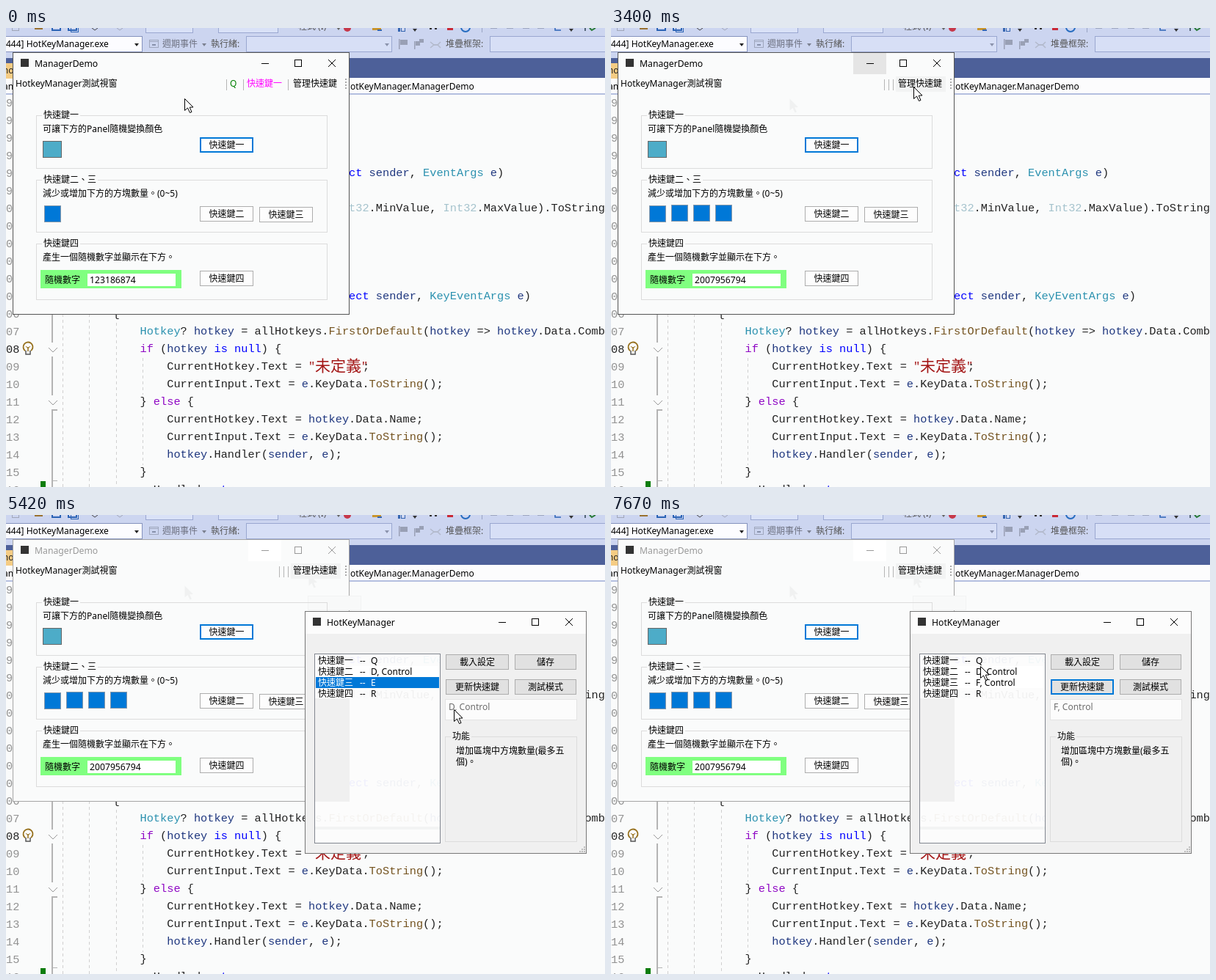
Write an HTML page with a canvas that moves like this. It is 816 px wide and 626 px high and loops after 8 s.

```html
<!DOCTYPE html>
<html lang="zh-Hant">
<head>
<meta charset="utf-8">
<title>Hotkey manager demo</title>
<style>
html, body { margin: 0; width: 100%; height: 100%; overflow: hidden; background: #fafbfb; }
canvas { display: block; }
</style>
</head>
<body>
<canvas id="stage" width="816" height="626"></canvas>
<script>
const LOOP = 8000, TICK = 69;
const UI = '"Noto Sans", "Noto Sans CJK TC", "Noto Sans CJK", sans-serif';
const MONO = '"Liberation Mono", "Noto Sans CJK TC", monospace';
const BLUE = '#0078d7', PAPER = '#fafbfb', GHOST = '#f0f1f1';
const COL = 9.18, CODE_X = 182.5;

const stage = document.getElementById('stage').getContext('2d');
const deskCanvas = document.createElement('canvas');
deskCanvas.width = 816;
deskCanvas.height = 626;
let g = deskCanvas.getContext('2d');

// Drawing helpers
function fill(x, y, w, h, color) {
  g.fillStyle = color;
  g.fillRect(x, y, w, h);
}
function frame(x, y, w, h, color, line = 1) {
  g.strokeStyle = color;
  g.lineWidth = line;
  g.strokeRect(x + line / 2, y + line / 2, w - line, h - line);
}
function box(x, y, w, h, back, edge, line = 1) {
  fill(x, y, w, h, back);
  frame(x, y, w, h, edge, line);
}
function path(points, color, width = 1, close = false) {
  g.beginPath();
  points.forEach(([x, y]) => g.lineTo(x, y));
  if (close) g.closePath();
  g.strokeStyle = color;
  g.lineWidth = width;
  g.stroke();
}
function label(text, x, y, color = '#000', size = 12, family = UI) {
  g.font = `${size}px ${family}`;
  g.fillStyle = color;
  g.fillText(text, x, y);
}
function disc(x, y, r, color) {
  g.beginPath();
  g.arc(x, y, r, 0, 7);
  g.fillStyle = color;
  g.fill();
}
function caret(x, y, color) {
  g.beginPath();
  g.moveTo(x - 3, y - 2);
  g.lineTo(x + 3, y - 2);
  g.lineTo(x, y + 2);
  g.fillStyle = color;
  g.fill();
}
function button(text, x, y, w, look = 'plain', back = '#fdfdfd') {
  const fills = { hover: '#e5f1fb', pressed: '#cce4f7' };
  const h = 21;
  box(x, y, w, h, fills[look] || back, look === 'plain' ? '#adadad' : BLUE, look === 'focus' ? 2 : 1);
  g.textAlign = 'center';
  label(text, x + w / 2, y + 15);
  g.textAlign = 'left';
}
function group(title, x, y, w, h, back) {
  frame(x, y, w, h, '#dcdcdc');
  fill(x + 8, y, title.length * 12 + 4, 1, back);
  label(title, x + 10, y + 4);
}
function windowBar(x, y, w, title, color) {
  fill(x + 11, y + 9, 11, 11, '#333');
  label(title, x + 30, y + 20, color, 12.2);
  const r = x + w;
  fill(r - 119, y + 15, 10, 1, color);
  frame(r - 74, y + 10, 10, 10, color);
  path([[r - 28, y + 10], [r - 18, y + 20]], color);
  path([[r - 18, y + 10], [r - 28, y + 20]], color);
}
function pointerShape(x, y) {
  const tip = [[0, 0], [0, 16], [4, 12.5], [7, 19], [9.5, 18], [6.7, 11.7], [11.5, 11.5]];
  g.beginPath();
  tip.forEach(([dx, dy]) => g.lineTo(x + .5 + dx, y + .5 + dy));
  g.closePath();
}
function pointer(x, y) {
  pointerShape(x, y);
  g.fillStyle = '#fff';
  g.fill();
  g.strokeStyle = '#000';
  g.lineWidth = 1;
  g.stroke();
}
function trace(x, y) {
  pointerShape(x, y);
  g.fillStyle = GHOST;
  g.fill();
}

// Editor behind the windows
const INK = { k: '#0000ff', t: '#2b91af', f: '#a5c3cd', m: '#74531f', v: '#1f377f', p: '#8f08c4', s: '#a31515', x: '#222' };
const CODE = [
  [98, 31, 'k:ct|v: sender|x:, |t:EventArgs|v: e|x:)'],
  [100, 31, 'f:t32|x:.MinValue, |f:Int32|x:.MaxValue).|x:ToString'],
  [105, 31, 'k:ect|v: sender|x:, |t:KeyEventArgs|v: e|x:)'],
  [106, -4, 'x:{'],
  [107, 0, 't:Hotkey|x:? |v:hotkey|x: = allHotkeys.|m:FirstOrDefault|x:(|v:hotkey|x: => |v:hotkey|x:.Data.Comb'],
  [108, 0, 'p:if|x: (|v:hotkey|k: is null|x:) {'],
  [109, 4, 'x:CurrentHotkey.Text = |s:"'],
  [110, 4, 'x:CurrentInput.Text = |v:e|x:.KeyData.|m:ToString|x:();'],
  [111, 0, 'x:} |p:else|x: {'],
  [112, 4, 'x:CurrentHotkey.Text = |v:hotkey|x:.Data.Name;'],
  [113, 4, 'x:CurrentInput.Text = |v:e|x:.KeyData.|m:ToString|x:();'],
  [114, 4, 'v:hotkey|x:.Handler(|v:sender|x:, |v:e|x:);'],
  [115, 0, 'x:}'],
  [116, 0, 'v:e|x:.Handled = |k:true|x:;']
];
const lineY = n => 101 + 24 * (n - 94);

function drawCode() {
  for (let n = 94; n <= 116; n++) {
    label(String(n % 100).padStart(2, '0'), 0, lineY(n) + 6, n === 108 ? '#222' : '#929292', 15.3, MONO);
  }
  for (const [n, col, source] of CODE) {
    let x = CODE_X + col * COL;
    for (const part of source.split('|')) {
      const text = part.slice(2);
      label(text, x, lineY(n) + 5, INK[part[0]], 15.3, MONO);
      x += text.length * COL;
    }
  }
  label('未定義', 421, 468, INK.s, 21, UI);
  label('"', 484, 466, INK.s, 15.3, MONO);
  label(';', 486, 466, INK.x, 15.3, MONO);
}

function drawGutter() {
  g.setLineDash([4, 4]);
  for (const x of [77.5, 113.5, 150.5]) path([[x, x > 150 ? 402 : 390], [x, 626]], '#d0d0d0');
  path([[186.5, 450], [186.5, 500]], '#d0d0d0');
  path([[186.5, 522], [186.5, 596]], '#d0d0d0');
  g.setLineDash([]);
  path([[63, 391], [63, 429]], '#b4b4b4', 2);
  path([[63, 448], [63, 501]], '#b4b4b4', 2);
  path([[70, 521], [63, 521], [63, 626]], '#b4b4b4', 2);
  path([[63, 617.5], [70, 617.5]], '#b4b4b4');
  for (const y of [436, 508]) path([[58, y], [64, y + 6], [70, y]], '#999');
  fill(47, 618, 7, 8, '#0b7d0b');
  g.beginPath();
  g.arc(30, 435, 6.5, 2.2, 7.2);
  g.strokeStyle = '#96701c';
  g.lineWidth = 1.8;
  g.stroke();
  path([[27, 440], [27, 445], [33, 445], [33, 440]], '#555', 1.5);
  path([[30, 441], [30, 435]], '#96701c', 1.5);
  path([[27, 434], [30, 437], [33, 434]], '#96701c');
}

function drawToolbars() {
  const edge = '#9aa7d0';
  fill(0, 0, 816, 41, '#ccd5f0');
  box(190, -10, 65, 17, '#d9e1f7', edge);
  box(289, -10, 82, 17, '#d9e1f7', edge);
  frame(8, -6, 10, 10, '#a0a6b8');
  fill(39, 0, 11, 2, '#9b7434');
  for (const x of [62, 84]) frame(x, -8, 13, 12, '#2b63b5', 2);
  frame(88, -4, 11, 10, '#2b63b5');
  path([[117, 0], [121, 3], [125, 0]], '#444');
  path([[151, 0], [155, 3], [159, 0]], '#a0a6b8');
  label('程式 (I)', 398, 2, '#555');
  caret(453, 1, '#666');
  disc(465, 0, 5, '#c6384a');
  fill(499, 0, 12, 3, '#c9962f');
  fill(506, 2, 6, 2, '#3465b0');
  fill(534, 0, 3, 5, '#3465b0');
  frame(538, -4, 6, 9, '#3465b0');
  caret(557, 3, '#333');
  fill(577, 0, 3, 2, '#333');
  fill(584, 0, 3, 2, '#333');
  fill(601, 0, 8, 3, '#c92b38');
  g.beginPath();
  g.arc(626, -1, 6, 0, 3.14);
  g.strokeStyle = '#276dc0';
  g.lineWidth = 2;
  g.stroke();
  fill(648, 0, 1, 6, '#99a4c4');
  for (const x of [660, 682, 704, 724]) fill(x, 0, 9, 1, '#9da6bf');
  path([[748, 0], [748, 3], [756, 3]], '#2b63b5', 1.5);
  caret(770, 3, '#333');
  fill(788, 0, 2, 4, '#567');
  path([[795, 0], [798, 3], [803, 0]], '#287a36', 2);

  box(-4, 11, 190, 22, '#fcfcff', '#8593bd');
  label('444] HotKeyManager.exe', 0, 26);
  caret(178, 23, '#222');
  frame(195, 16, 13, 11, '#9fa7bd');
  fill(195, 18, 13, 1, '#9fa7bd');
  path([[199, 23], [204, 23]], '#8791ab', 2);
  label('週期事件', 213, 26, '#6d7180');
  caret(270, 23, '#7b8090');
  label('執行緒:', 279, 26, '#555');
  box(327, 11, 199, 22, '#d7dff6', edge);
  caret(519, 23, '#8b93ac');
  fill(535, 15, 1.5, 14, '#99a0b5');
  fill(537, 16, 10, 7, '#99a0b5');
  fill(556, 18, 1.5, 11, '#99a0b5');
  fill(558, 18, 6, 6, '#99a0b5');
  fill(563, 15, 6, 5, '#99a0b5');
  path([[578, 19], [583, 23], [588, 23], [592, 19]], '#b2b9cb', 1.5);
  path([[578, 27], [583, 23], [588, 23], [592, 27]], '#b2b9cb', 1.5);
  label('堆疊框架:', 599, 26, '#555');
  box(659, 11, 170, 22, '#d7dff6', edge);

  fill(0, 41, 816, 27, '#4d6099');
  fill(0, 48, 10, 21, '#f5cc84');
  label('mo', -8, 62, '#222');
  fill(0, 69, 816, 20, '#fcfcfd');
  fill(0, 89, 816, 2, '#b4bfe0');
  label('an', -4, 84);
  label('otKeyManager.ManagerDemo', 469, 84);
}

fill(0, 0, 816, 626, PAPER);
drawCode();
drawGutter();
drawToolbars();

// Timeline: hard state changes
const STEPS = [
  [0, { key: 'Q', name: '一', number: '123186874', blocks: 1, hover: '', input: 'F, Control', keys: ['Q', 'W', 'E', 'R'], row: -1, update: 'plain' }],
  [530, { key: 'W', name: '二', blocks: 0 }],
  [990, { key: 'E', name: '三', blocks: 1 }],
  [1530, { key: 'R', name: '四', number: '1640283975' }],
  [1860, { number: '1673519028' }],
  [2060, { number: '2007956794' }],
  [2390, { key: 'E', name: '三', blocks: 2 }],
  [2590, { blocks: 3 }],
  [2860, { blocks: 4 }],
  [3200, { moved: true }],
  [3330, { key: '', name: '', hover: 'manage' }],
  [3400, { hover: 'minimize', visited: true }],
  [3470, { hover: 'manage', tip: true }],
  [3540, { hover: '', dialog: true }],
  [3605, { row: 1, help: ['減少區塊中方塊數量。'] }],
  [3815, { input: 'ControlKey, Control' }],
  [3955, { input: 'D, Control', update: 'hover' }],
  [4350, { update: 'pressed' }],
  [4475, { update: 'focus', row: -1, keys: ['Q', 'D, Control', 'E', 'R'] }],
  [5085, { row: 2 }],
  [5160, { help: ['增加區塊中方塊數量(最多五', '個)。'] }],
  [5230, { update: 'plain' }],
  [5780, { input: 'ControlKey, Control' }],
  [6510, { input: 'F, Control', update: 'hover' }],
  [6640, { update: 'pressed' }],
  [6840, { update: 'focus', row: -1, keys: ['Q', 'D, Control', 'F, Control', 'R'] }],
  [7250, { save: 'hover' }],
  [7390, { save: 'plain' }]
];
// Pointer runs: start time, then one point per tick
const RUNS = [
  [0, [243, 96]],
  [3200, [300, 92], [370, 85], [412, 80], [354, 59], [414, 82], [560, 200], [678, 296], [672, 286], [664, 276], [658, 260], [655, 243], [655, 230]],
  [4545, [640, 226], [621, 222], [585, 216], [548, 216], [520, 219], [504, 222], [496, 223], [493, 223]],
  [5230, [515, 235], [564, 254], [610, 265], [645, 276], [660, 282], [657, 268], [655, 252], [654, 240], [654, 234]],
  [7180, [690, 208], [722, 194], [716, 178], [668, 161], [612, 164], [560, 181], [520, 198], [503, 206]]
];

function stateAt(t) {
  return Object.assign({}, ...STEPS.filter(([at]) => at <= t).map(([, change]) => change));
}
function pointerAt(t) {
  const [start, ...points] = RUNS.filter(([at]) => at <= t).pop();
  return points[Math.min(points.length - 1, Math.floor((t - start) / TICK))];
}

function drawMain(s) {
  box(9, 33, 459, 358, PAPER, s.dialog ? '#a5a5a5' : '#555');
  if (s.hover === 'minimize') fill(330, 34, 45, 29, '#e5e5e5');
  if (s.dialog) fill(330, 34, 45, 29, '#fff');
  if (s.moved) trace(243, 96);
  if (s.visited) {
    trace(412, 80);
    fill(388, 66, 68, 21, '#f2f3f3');
  }
  windowBar(9, 33, 458, 'ManagerDemo', s.dialog ? '#999' : '#000');

  if (s.hover === 'manage') box(388, 65, 67, 22, '#b3d7f3', BLUE);
  label('HotkeyManager測試視窗', 13, 80);
  const keyX = { Q: 305, W: 303, E: 308, R: 307 }[s.key];
  for (const x of s.key ? [keyX - 5, 323, 384] : [372, 378, 384]) fill(x, 70, 1, 15, '#b5b5b5');
  if (s.key) {
    label(s.key, keyX, 80, '#008000');
    label('快速鍵' + s.name, 328, 80, '#ff00ff');
  }
  label('管理快速鍵', 391, 80);
  for (let y = 69; y < 84; y += 4) fill(462, y, 2, 2, '#aaa');
  if (s.tip) box(411, 110, 73, 20, s.dialog ? '#f8f9f9' : '#fff', s.dialog ? '#f2f3f3' : '#777');
  if (s.tip && !s.dialog) label('管理快速鍵', 417, 124, '#555');

  group('快速鍵一', 41, 119, 397, 73, PAPER);
  label('可讓下方的Panel隨機變換顏色', 50, 142);
  box(50, 154, 26, 23, '#4dacc8', '#666');
  button('快速鍵一', 264, 149, 73, 'focus');

  group('快速鍵二、三', 41, 207, 397, 72, PAPER);
  label('減少或增加下方的方塊數量。(0~5)', 50, 230);
  for (let i = 0; i < s.blocks; i++) box(52 + 30 * i, i ? 241 : 242, 23, 23, BLUE, '#8598aa');
  button('快速鍵二', 264, 243, 73);
  button('快速鍵三', 345, 244, 73);

  group('快速鍵四', 41, 294, 397, 77, PAPER);
  label('產生一個隨機數字並顯示在下方。', 50, 317);
  fill(47, 330, 192, 25, '#80ff80');
  label('隨機數字', 53, 348);
  fill(111, 335, 120, 17, '#fff');
  label(s.number, 114, 348, '#000', 12.2);
  button('快速鍵四', 264, 331, 73);
}

function drawDialog(s) {
  const GRAY = '#f0f0f0';
  box(407, 131, 384, 331, GRAY, '#777');
  fill(408, 132, 382, 30, '#fcfcfc');
  windowBar(407, 131, 383, 'HotKeyManager', '#000');

  fill(420, 189, 172, 259, '#fcfcfc');
  fill(421, 250, 47, 141, GRAY);
  g.save();
  g.beginPath();
  g.rect(468, 190, 123, 257);
  g.rect(421, 391, 47, 56);
  g.clip();
  g.globalAlpha = .05;
  g.drawImage(deskCanvas, 0, 0);
  g.restore();
  fill(421, 425, 170, 4, '#f3f4f4');
  frame(420, 189, 172, 259, '#828790');
  s.keys.forEach((key, i) => {
    const y = 191 + 15 * i, on = s.row === i, ink = on ? '#fff' : '#000';
    if (on) fill(422, y, 168, 15, BLUE);
    else if (key.length > 1) fill(468, y, 122, 15, '#fff');
    label('快速鍵' + '一二三四'[i], 425, y + 12, ink);
    label('--', 482, y + 12, ink);
    label(key, 497, y + 12, ink);
  });

  button('載入設定', 599, 190, 86, 'plain', '#e1e1e1');
  button('儲存', 693, 190, 84, s.save || 'plain', '#e1e1e1');
  button('更新快速鍵', 599, 224, 86, s.update, '#e1e1e1');
  button('測試模式', 693, 224, 84, 'plain', '#e1e1e1');
  box(598, 251, 180, 29, '#fcfcfc', '#e3e3e3');
  label(s.input, 603, 266, '#6d6d6d');

  group('功能', 598, 302, 180, 144, GRAY);
  (s.help || []).forEach((text, i) => label(text, 613, 326 + 15 * i));
  for (let i = 0; i < 3; i++) {
    for (let j = 0; j <= i; j++) fill(787 - 3 * j, 452 + 3 * i, 2, 2, '#bbb');
  }
}

g = stage;
function draw(t) {
  const s = stateAt(t);
  g.drawImage(deskCanvas, 0, 0);
  drawMain(s);
  if (s.dialog) drawDialog(s);
  pointer(...pointerAt(t));
}

const began = performance.now();
function tick(now) {
  draw(Math.max(0, now - began) % LOOP);
  requestAnimationFrame(tick);
}
draw(0);
requestAnimationFrame(tick);
</script>
</body>
</html>
```
